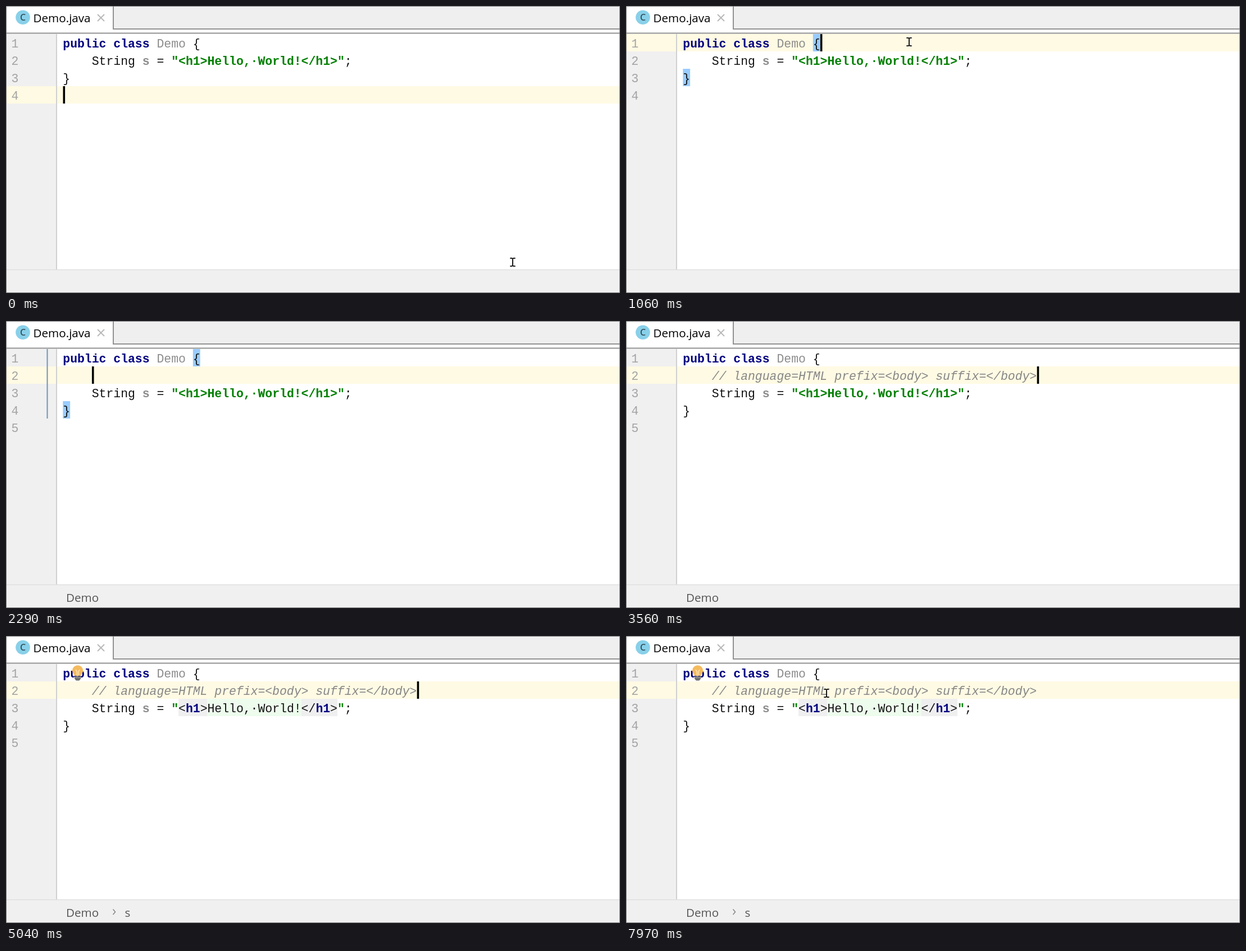
These frames come from a looping animation (1093 px wide and 512 px high, 8 s). An HTML page:

```html
<!DOCTYPE html>
<html lang="en">
<head>
<meta charset="utf-8">
<title>Editor</title>
<style>
  html, body { margin: 0; width: 100%; height: 100%; overflow: hidden; background: #fff; }
  svg { display: block; }
  text { white-space: pre; }
  .code { font: 21.43px "Liberation Mono", "Courier New", monospace; fill: #111; }
  .ui { font: 20.6px "Open Sans", "Noto Sans", sans-serif; fill: #555; }
  .b { font-weight: bold; }
  .key { font-weight: bold; fill: #000080; }
  .str { font-weight: bold; fill: #008000; }
  .dim { fill: #8c8c8c; }
  .note { fill: #868686; font-style: italic; }
  .num { fill: #a3a3a3; }
</style>
</head>
<body>
<svg id="stage" width="1093" height="512" viewBox="0 0 1093 512">
  <rect width="1093" height="512" fill="#fff"/>
  <rect x="190" width="903" height="41" fill="#efefef"/>
  <path d="M191 0V41H1093M0 48.5H1093" fill="none" stroke="#929292" stroke-width="2"/>
  <circle cx="30" cy="20.3" r="12.8" fill="#88d0e9"/>
  <text class="ui" x="30" y="26" text-anchor="middle" style="font-size:16px;font-weight:600;fill:#37525e">C</text>
  <text class="ui" x="48.5" y="29" style="fill:#000">Demo.java</text>
  <path d="M163 15L175 27M175 15L163 27" stroke="#b9b9b9" stroke-width="2"/>
  <rect y="50" width="90" height="420" fill="#f0f0f0"/>
  <g id="back"></g>
  <path d="M90 50V470" stroke="#d0d0d0" stroke-width="2"/>
  <rect id="scope" x="72.5" y="50" width="2" fill="#6d94bb"/>
  <g id="code"></g>
  <rect y="470" width="1093" height="42" fill="#f0f0f0"/>
  <path d="M0 470.5H1093" stroke="#dedede" stroke-width="1.5"/>
  <text id="crumb" class="ui" x="107" y="501">Demo</text>
  <g id="field">
    <path d="M190.5 487.5L194.5 492.2L190.5 497" fill="none" stroke="#888" stroke-width="1.6"/>
    <text class="ui" x="211.5" y="501">s</text>
  </g>
  <g id="bulb">
    <path d="M122 71C122 68 118 66.5 118 61.8A9.6 9.6 0 0 1 137.2 61.8C137.2 66.5 133.2 68 133.2 71Z" fill="#f4ba5e"/>
    <path d="M124 60L126.3 63.5V70M131.2 60L128.9 63.5V70" fill="none" stroke="#fce3b2" stroke-width="1.5"/>
    <path d="M122 71.5H133.2V76L130.5 79.5H124.7L122 76Z" fill="#6e6e6e"/>
    <path d="M122 74.3H133.2" stroke="#a5a5a5"/>
  </g>
  <rect id="caret" width="3.6" height="31" fill="#000"/>
  <path id="mouse" d="M-4.7 -7.2H-1.6L0 -6L1.6 -7.2H4.7M0 -6V6M-4.7 7.2H-1.6L0 6L1.6 7.2H4.7" fill="none" stroke="#000" stroke-width="1.8"/>
  <rect x=".5" y=".5" width="1092" height="511" fill="none" stroke="#727272"/>
</svg>
<script>
const LOOP = 8000, LEFT = 101.3, PITCH = 12.86, ROW = 31.15;
const $ = id => document.getElementById(id);
const colX = col => LEFT + col * PITCH;
const rowY = row => Math.round(49.7 + row * ROW);

function add(parent, tag, attrs, content = "") {
  const el = document.createElementNS("http://www.w3.org/2000/svg", tag);
  for (const key in attrs) el.setAttribute(key, attrs[key]);
  el.textContent = content;
  parent.append(el);
  return el;
}
const group = parent => add(parent, "g", {});
const show = (el, on) => el.setAttribute("visibility", on ? "visible" : "hidden");
const place = (el, x, y) => el.setAttribute("transform", `translate(${x} ${y})`);

// Lays out [text, class] pairs from a starting column.
function line(parent, col, ...parts) {
  for (const [text, style = ""] of parts) {
    add(parent, "text", { class: "code " + style, x: colX(col), y: 24.4 }, text);
    col += text.length;
  }
}
function block(parent, col, count, fill) {
  return add(parent, "rect", { x: colX(col), width: count * PITCH, height: 31, fill });
}

const band = add($("back"), "rect", { width: 1093, height: 31, fill: "#fffae3" });
const open = block($("back"), 18, 1, "#99ccff");
const close = block($("back"), 0, 1, "#99ccff");
open.setAttribute("y", rowY(0));

const rows = ["head", "note", "body", "end"].reduce(
  (all, name) => ({ ...all, [name]: group($("code")) }), {});
line(rows.head, 0, ["public class", "key"], [" Demo", "dim"], [" {"]);
line(rows.note, 4, ["// language=HTML prefix=<body> suffix=</body>", "note"]);
line(rows.body, 4, ["String "], ["s", "b dim"], [" = "], ['"', "str"]);
line(rows.body, 38, ['"', "str"], [";"]);
line(rows.end, 0, ["}"]);

const plain = group(rows.body), markup = group(rows.body);
line(plain, 16, ["<h1>Hello,·World!</h1>", "str"]);
block(markup, 16, 4, "#efefef");
block(markup, 20, 13, "#edfced");
block(markup, 33, 5, "#efefef");
line(markup, 16, ["<"], ["h1", "key"], [">Hello,·World!</"], ["h1", "key"], [">"]);

const numbers = [0, 1, 2, 3, 4].map(row =>
  add($("code"), "text", { class: "code num", x: 9.6, y: rowY(row) + 24.4 }, row + 1));

const start = {
  mouse: [902, 457], row: 3, col: 0, caret: true, extra: 0,
  braces: false, scope: false, note: false, crumb: false, field: false, markup: false, bulb: false
};
const steps = [
  [120, { mouse: [893, 448], caret: false }],
  [240, { mouse: [857, 411] }],
  [400, { mouse: [753, 260] }],
  [540, { mouse: [625, 142] }],
  [660, { mouse: [530, 79], caret: true }],
  [780, { mouse: [504, 64] }],
  [1060, { row: 0, col: 19, braces: true }],
  [1330, { mouse: [515, 60], scope: true }],
  [1450, { mouse: [522, 57], crumb: true }],
  [2130, { caret: false }],
  [2290, { mouse: null, row: 1, col: 4, caret: true, extra: 1 }],
  [3560, { col: 49, note: true, braces: false, scope: false }],
  [3720, { field: true }],
  [3870, { markup: true }],
  [4330, { bulb: true }],
  [4610, { caret: false }],
  [5040, { caret: true }],
  [5600, { caret: false }],
  [6160, { caret: true }],
  [6530, { caret: false }],
  [7130, { caret: true }],
  [7580, { caret: false }],
  [7700, { mouse: [440, 47] }],
  [7820, { mouse: [388, 53] }],
  [7970, { mouse: [357, 102] }]
];

function draw(time) {
  const s = { ...start };
  for (const [at, change] of steps) if (at <= time) Object.assign(s, change);

  band.setAttribute("y", rowY(s.row));
  place(rows.head, 0, rowY(0));
  place(rows.note, 0, rowY(1));
  place(rows.body, 0, rowY(1 + s.extra));
  place(rows.end, 0, rowY(2 + s.extra));
  close.setAttribute("y", rowY(2 + s.extra));
  $("scope").setAttribute("height", rowY(3 + s.extra) - 50);
  place($("caret"), colX(s.col) + 0.2, rowY(s.row));
  if (s.mouse) place($("mouse"), ...s.mouse);

  show(open, s.braces);
  show(close, s.braces);
  show(rows.note, s.note);
  show(plain, !s.markup);
  show(markup, s.markup);
  show(numbers[4], s.extra);
  for (const id of ["scope", "crumb", "field", "bulb", "caret", "mouse"]) show($(id), s[id]);
}

const begin = performance.now();
function tick() {
  draw((performance.now() - begin) % LOOP);
  requestAnimationFrame(tick);
}
tick();
</script>
</body>
</html>
```
